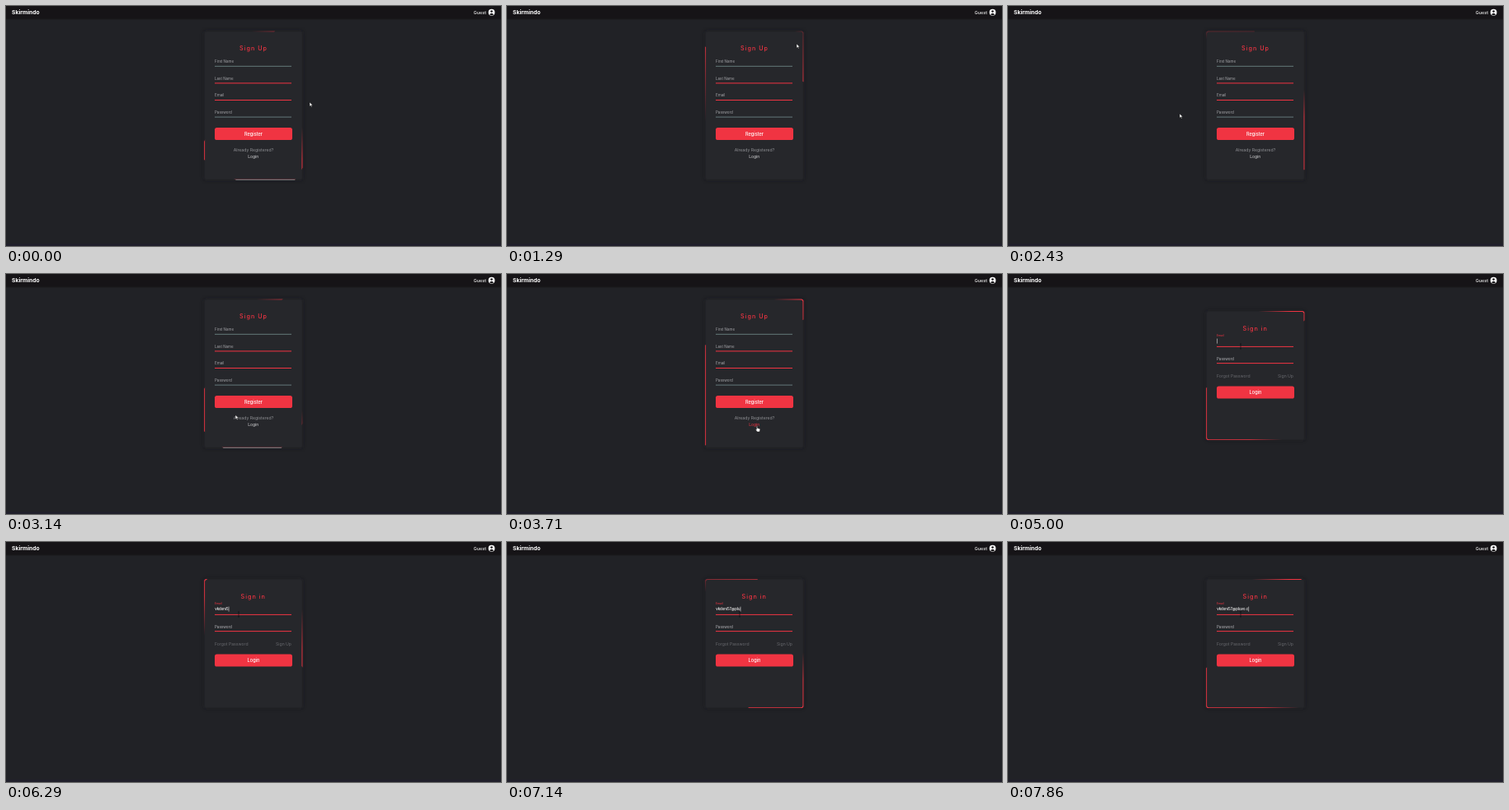
An HTML page that plays this animation: 600x292 px, repeating every 8000 ms.

```html
<!DOCTYPE html>
<html lang="en">
<head>
<meta charset="utf-8">
<title>Sign up and sign in</title>
<style>
  html, body { margin: 0; width: 100%; height: 100%; overflow: hidden; background: #212226; }
  svg { display: block; width: 100vw; height: 100vh; }
  text { font-family: Inter, "Open Sans", sans-serif; dominant-baseline: central; }
</style>
</head>
<body>
<svg id="stage" viewBox="0 0 600 292">
  <defs>
    <linearGradient id="red" x1="0" y1="1" x2="0" y2="0">
      <stop offset=".25" stop-color="#f03442" stop-opacity="0"/>
      <stop offset=".5" stop-color="#f03442"/>
    </linearGradient>
    <linearGradient id="teal" x1="0" y1="1" x2="0" y2="0">
      <stop offset=".25" stop-color="#6f8c8e" stop-opacity="0"/>
      <stop offset=".5" stop-color="#6f8c8e"/>
    </linearGradient>
    <filter id="blur" x="-20%" y="-20%" width="140%" height="140%"><feGaussianBlur stdDeviation="2.5"/></filter>
  </defs>
  <rect width="600" height="292" fill="#212226"/>
  <rect y="289" width="600" height="3" fill="#201f2b"/>
  <rect width="600" height="16.5" fill="#1b1a1d"/>
  <rect width="600" height="15.5" fill="#161417"/>
  <g id="header"></g>
  <g id="signUp"></g>
  <g id="signIn"></g>
  <g id="pointer" stroke="#111" stroke-width=".5" stroke-linejoin="round" fill="#fff">
    <path id="arrow" d="M0 0V5.2L1.3 4.1L2.2 6L3.1 5.6L2.2 3.8H3.9Z"/>
    <path id="hand" d="M-.6 .5Q0 -.4 .6 .5V2.6L3.3 3.3Q4 3.6 3.8 4.5L3.2 7H.2L-1.6 4.6Q-1.5 3.7 -.6 4.2Z"/>
    <path id="beam" d="M-1 -3H1M0 -3V3M-1 3H1" fill="none" stroke="#101114" stroke-width=".7"/>
  </g>
</svg>
<script>
const LOOP = 8000, TICKS = 56, TICK = LOOP / TICKS;
const PAGE_SWITCH = 4075, FOCUS = 4560;
const RED = '#f03442', TEAL = '#64797b', LABEL = '#a3a4a8', MUTED = '#68696e';
const $ = id => document.getElementById(id);

function add(parent, tag, attrs, content = '') {
  const node = document.createElementNS('http://www.w3.org/2000/svg', tag);
  for (const key in attrs) node.setAttribute(key, attrs[key]);
  node.textContent = content;
  return parent.appendChild(node);
}

function text(parent, content, x, y, size, fill, anchor = 'start', extra = {}) {
  return add(parent, 'text', { x, y, 'font-size': size, fill, 'text-anchor': anchor, ...extra }, content);
}

// Card whose border is lit by two opposite rotating panels behind its face.
function card(parent, top, height, tealBottom) {
  const outer = { x: 240.2, y: top - .5, width: 119.2, height: height + 1.1, rx: 2.8 };
  const pivot = top - height / 2 + 130;
  add(parent, 'rect', { ...outer, fill: '#17181b', opacity: .55, filter: 'url(#blur)' });
  add(parent, 'rect', { ...outer, fill: '#232428' });
  const panels = [];

  function light(gradient, area) {
    const id = parent.id + gradient;
    add(add(parent, 'clipPath', { id }), 'rect', area);
    const group = add(parent, 'g', { 'clip-path': `url(#${id})` });
    for (const turn of [0, 180]) {
      const node = add(group, 'rect', { x: 182, y: pivot - 130, width: 118, height: 130, fill: `url(#${gradient})` });
      panels.push({ node, turn });
    }
  }
  light('red', outer);
  if (tealBottom) light('teal', { x: 242, y: top + height - .3, width: 116, height: 1 });
  add(parent, 'rect', { x: 241.1, y: top + .4, width: 117.4, height: height - .6, rx: 2.4, fill: '#26272b' });

  return angle => panels.forEach(({ node, turn }) =>
    node.setAttribute('transform', `rotate(${angle + turn} 300 ${pivot})`));
}

function title(parent, content, x, y) {
  text(parent, content, x, y, 7.2, RED, 'start', { 'letter-spacing': 1, 'font-weight': 500 });
}

function underline(parent, y, fill) {
  add(parent, 'rect', { x: 253, y: y - .5, width: 93, height: 1, fill });
}

function button(parent, content, y) {
  add(parent, 'rect', { x: 253, y, width: 94, height: 15, rx: 2.6, fill: RED });
  text(parent, content, 300, y + 7.5, 5.6, '#fff', 'middle', { 'font-weight': 500 });
}

// Header
text($('header'), 'Skirmindo', 7, 7.7, 6.8, '#fff', 'start', { 'font-weight': 700 });
text($('header'), 'Guest', 582, 7.7, 5.4, '#eee', 'end', { 'font-weight': 500 });
add($('header'), 'circle', { cx: 588.6, cy: 7.7, r: 3.9, fill: '#fff' });
add($('header'), 'circle', { cx: 588.6, cy: 6.5, r: 1.3, fill: '#161417' });
add($('header'), 'path', { d: 'M586 10.2Q588.6 7.2 591.2 10.2Q588.6 12 586 10.2Z', fill: '#161417' });

// Sign up page
const signUp = $('signUp');
const turnSignUp = card(signUp, 31, 180, true);
title(signUp, 'Sign Up', 283, 51.8);
['First Name', 'Last Name', 'Email', 'Password'].forEach((name, i) => {
  text(signUp, name, 253, 67.6 + i * 20.6, 4.5, LABEL);
  underline(signUp, 73.3 + i * 20.6, i % 3 ? RED : TEAL);
});
button(signUp, 'Register', 148);
text(signUp, 'Already Registered?', 300, 175.3, 5.15, '#8f9094', 'middle');
const loginLink = text(signUp, 'Login', 299.7, 182.8, 5, '#d8d8da', 'middle');

// Sign in page
const signIn = $('signIn');
const turnSignIn = card(signIn, 45.5, 156, false);
title(signIn, 'Sign in', 284.5, 66.8);
const emailLabel = text(signIn, 'Email', 253, 82, 4.5, LABEL);
const typed = text(signIn, '', 253.2, 81.7, 4.3, '#fff', 'start', { 'font-weight': 500 });
const caret = add(signIn, 'rect', { y: 78.6, width: .6, height: 6, fill: '#ddd' });
underline(signIn, 88.4, RED);
text(signIn, 'Password', 253, 103, 4.5, '#b4b5b9');
underline(signIn, 108.6, RED);
text(signIn, 'Forgot Password', 253, 124.2, 5.1, MUTED);
text(signIn, 'Sign Up', 346, 124.2, 5.1, MUTED, 'end');
button(signIn, 'Login', 136.5);

const ADDRESS = 'vkdoni57@pluvo.c';
const POINTER_PATH = [
  [0, 368, 117], [140, 376, 104], [570, 22, 7], [1140, 340, 44], [1290, 351, 46],
  [1570, 386, 110], [1860, 340, 186], [2290, 212, 135], [2430, 208, 131], [2570, 207, 133],
  [3430, 303, 185], [4140, 303, 185], [4430, 282, 88]
];

const ease = p => p * p * (3 - 2 * p);
const clamp = p => Math.min(1, Math.max(0, p));

function pointerAt(t) {
  const next = POINTER_PATH.findIndex(point => point[0] > t);
  if (next < 0) return POINTER_PATH.at(-1).slice(1);
  const [t0, x0, y0] = POINTER_PATH[next - 1], [t1, x1, y1] = POINTER_PATH[next];
  const p = ease((t - t0) / (t1 - t0));
  return [x0 + (x1 - x0) * p, y0 + (y1 - y0) * p];
}

const show = (node, on) => node.setAttribute('display', on ? 'inline' : 'none');

function draw(t) {
  const onSignIn = t >= PAGE_SWITCH;
  show(signUp, !onSignIn);
  show(signIn, onSignIn);
  turnSignUp(32.6 + t * .06);
  turnSignIn((t - PAGE_SWITCH) * .06);

  const [x, y] = pointerAt(t);
  const onLink = !onSignIn && Math.abs(x - 300) < 7.5 && y > 179 && y < 187;
  const onField = onSignIn && y > 76 && y < 92;
  $('pointer').setAttribute('transform', `translate(${x} ${y})`);
  show($('hand'), onLink);
  show($('beam'), onField);
  show($('arrow'), !onLink && !onField);
  loginLink.setAttribute('fill', onLink ? RED : '#d8d8da');

  const lift = ease(clamp((t - FOCUS) / 350));
  emailLabel.setAttribute('y', 82 - 7 * lift);
  emailLabel.setAttribute('font-size', 4.5 - 1.1 * lift);
  emailLabel.setAttribute('fill', lift > .5 ? RED : LABEL);

  const half = t < 6290 ? Math.floor((t - 5130) / 145) : 8 + Math.floor((t - 6280) / 197);
  const count = Math.min(ADDRESS.length, Math.max(0, half));
  typed.textContent = ADDRESS.slice(0, count);
  caret.setAttribute('x', 253.4 + (count ? typed.getComputedTextLength() : 0));
  show(caret, t >= FOCUS);
}

function frame(now) {
  // The screen updates about seven times a second.
  const tick = Math.floor((now % LOOP + 5) / TICK) % TICKS;
  draw(tick * TICK);
  requestAnimationFrame(frame);
}

const start = performance.now();
requestAnimationFrame(function loop() {
  frameAt(performance.now() - start);
  requestAnimationFrame(loop);
});

function frameAt(elapsed) {
  draw(Math.floor((elapsed % LOOP + 5) / TICK) % TICKS * TICK);
}
draw(0);
</script>
</body>
</html>
```
